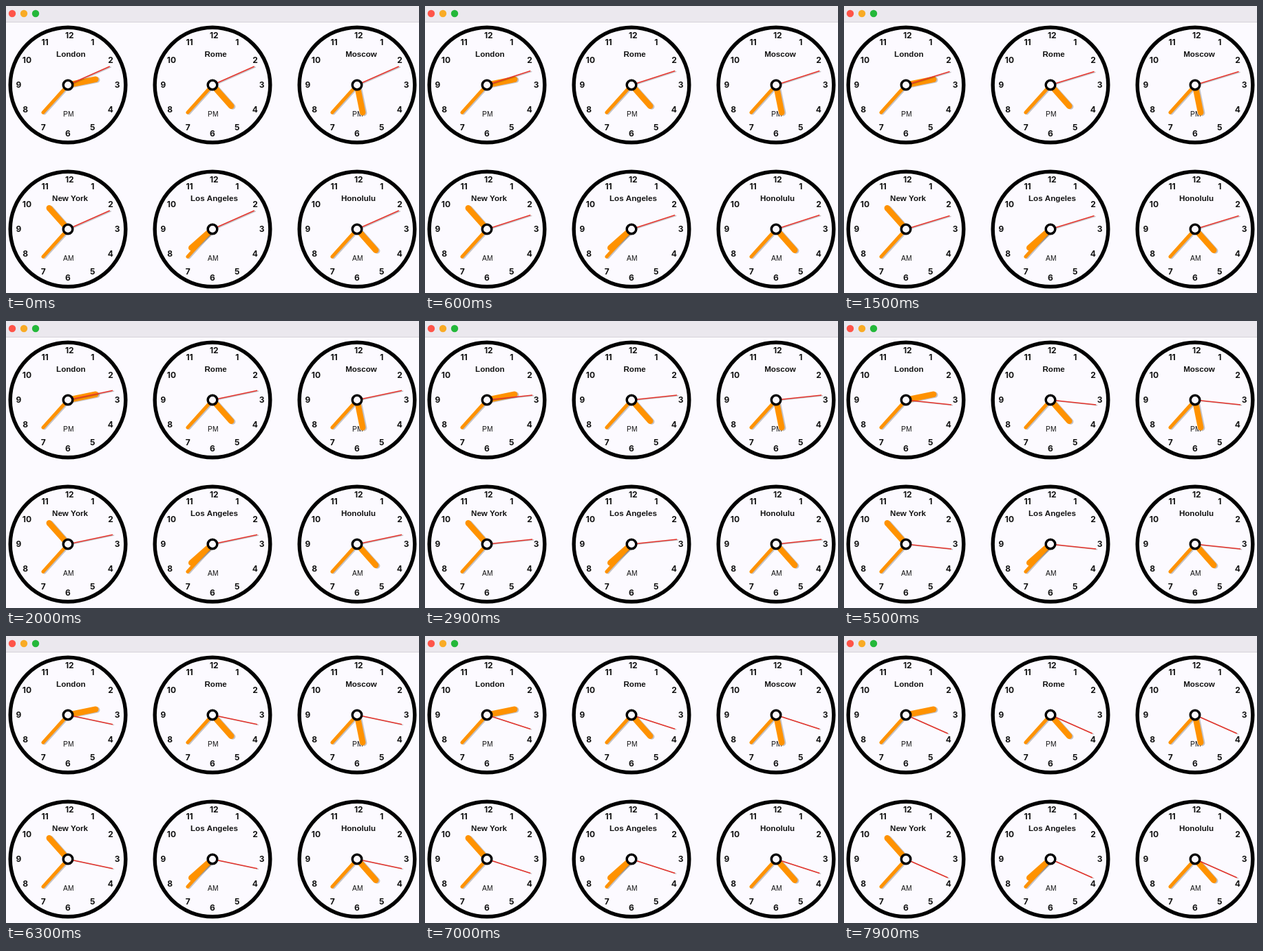
Recreate the animation shown at these times as an HTML page with a canvas. Size 600 px wide and 418 px high, loop 8 s.

```html
<!DOCTYPE html>
<html lang="en">
<head>
<meta charset="utf-8">
<title>World clocks</title>
<style>
  html, body { margin: 0; width: 100%; height: 100%; overflow: hidden; background: #fcfaff; }
  canvas { display: block; width: 600px; height: 418px; }
</style>
</head>
<body>
<canvas id="stage" width="600" height="418"></canvas>
<script>
const ctx = document.getElementById('stage').getContext('2d');
const LOOP = 8000, STEP = 100;
const MINUTE = 37, FIRST_SECOND = 11;
const TICKS = [360, 1440, 2540, 3540, 4540, 5540, 6440, 7540];
const SETTLE = 350;
const PAPER = '#fcfaff', ORANGE = '#ff9200', RED = '#e5342c';

// name, hour, half of day, label offset from the clock's centre
const CLOCKS = [
  ['London', 2, 'PM', 4.3], ['Rome', 4, 'PM', 4.6], ['Moscow', 5, 'PM', 6],
  ['New York', 10, 'AM', 3], ['Los Angeles', 7, 'AM', 2.5], ['Honolulu', 4, 'AM', 2]
];

function dot(x, y, r, color) {
  ctx.fillStyle = color;
  ctx.beginPath();
  ctx.arc(x, y, r, 0, 2 * Math.PI);
  ctx.fill();
}

function ring(r, width) {
  ctx.lineWidth = width;
  ctx.strokeStyle = '#000';
  ctx.beginPath();
  ctx.arc(0, 0, r, 0, 2 * Math.PI);
  ctx.stroke();
}

function label(text, x, y, font) {
  ctx.font = font;
  ctx.fillStyle = '#111';
  ctx.fillText(text, x, y);
}

function hand(degrees, length, width, color, cap) {
  const a = degrees * Math.PI / 180;
  const x = Math.sin(a) * length, y = -Math.cos(a) * length;
  const line = (dx, dy, style) => {
    ctx.strokeStyle = style;
    ctx.beginPath();
    ctx.moveTo(dx, dy);
    ctx.lineTo(x + dx, y + dy);
    ctx.stroke();
  };
  ctx.lineWidth = width;
  ctx.lineCap = cap;
  line(2, 0.8, 'rgba(0,0,0,0.22)');
  line(0, 0, color);
}

// Damped spring response from 0 to 1
function spring(age) {
  if (age <= 0) return 0;
  if (age >= SETTLE) return 1;
  const n = age / 16, decay = 0.1, freq = 0.148;
  return 1 - Math.exp(-decay * n) * (Math.cos(freq * n) + decay / freq * Math.sin(freq * n));
}

function drawClock([city, hour, half, shift], x, y, second) {
  ctx.save();
  ctx.translate(x, y);
  ring(83.8, 5.4);
  for (let n = 1; n <= 12; n++) {
    const a = n * Math.PI / 6;
    label(n, Math.sin(a) * 71.5 + (n > 9 ? 2.3 : 0), 3.9 - Math.cos(a) * 71.5,
      'bold 12px Inter, sans-serif');
  }
  label(city, shift, -41, 'bold 11.6px "Liberation Sans", sans-serif');
  label(half, 0.8, 45.5, '10.3px "Liberation Sans", sans-serif');
  hand((hour + MINUTE / 60) * 30, 41, 8.6, ORANGE, 'round');
  hand(MINUTE * 6, 54, 5, ORANGE, 'round');
  hand(second * 6, 66.5, 1.5, RED, 'butt');
  dot(0, 0, 7, PAPER);
  ring(6.8, 3.5);
  ctx.restore();
}

function draw(time) {
  const second = TICKS.reduce((sum, tick) => sum + spring(time - tick), FIRST_SECOND);
  ctx.fillStyle = PAPER;
  ctx.fillRect(0, 0, 600, 418);
  ctx.fillStyle = '#ebe8ee';
  ctx.fillRect(0, 0, 600, 23);
  ctx.fillStyle = '#d6d3d9';
  ctx.fillRect(0, 23, 600, 1);
  ['#ff5449', '#f9ab25', '#24b83a'].forEach((color, i) => dot(9 + 17 * i, 11, 5.2, color));
  ctx.textAlign = 'center';
  CLOCKS.forEach((clock, i) =>
    drawClock(clock, 90 + 210 * (i % 3), 115 + 210 * Math.floor(i / 3), second));
}

const start = performance.now();
function frame() {
  const time = (performance.now() - start) % LOOP;
  draw(Math.floor(time / STEP) * STEP);
  requestAnimationFrame(frame);
}
frame();
</script>
</body>
</html>
```
